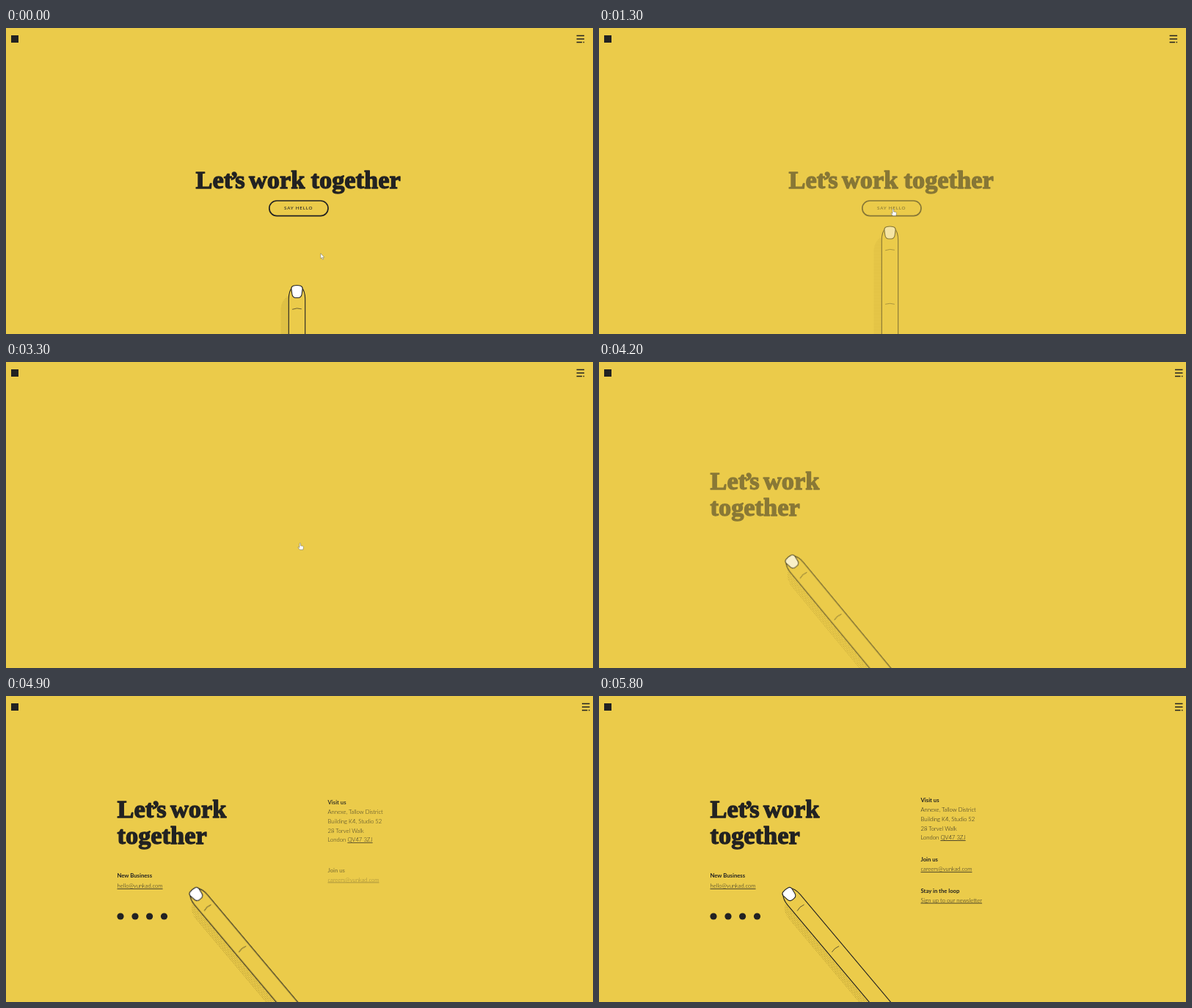
Animation of 800 by 418 pixels, one loop 5900 ms. Source, as an HTML page:

```html
<!DOCTYPE html>
<html lang="en">
<head>
<meta charset="utf-8">
<title>Let’s work together</title>
<style>
  html, body { margin: 0; width: 100%; height: 100%; overflow: hidden; background: #ebcb4a; }
  svg { display: block; width: 800px; height: 418px; fill: #222; }
  text { font: 300 7.7px Lato, sans-serif; white-space: pre; }
  .title { font: bold 34.4px "Liberation Serif", "Times New Roman", serif; stroke: #222; stroke-width: 1.3; stroke-linejoin: round; }
  .b { font-weight: 700; }
  .u { text-decoration: underline .6px; text-underline-offset: 1.8px; }
  .say { font-size: 6.2px; font-weight: 500; letter-spacing: .85px; }
  .line { fill: none; stroke: #222; stroke-width: 1.1; stroke-linecap: round; }
  .crease { stroke-width: .8; opacity: .8; }
  .cursor { fill: #fff; stroke: #665; stroke-width: .5; stroke-linejoin: round; }
</style>
</head>
<body>
<svg viewBox="0 0 800 418">
  <defs>
    <pattern id="dots" width="2" height="2" patternUnits="userSpaceOnUse">
      <rect width="1" height="1" fill="#6b5510" opacity=".5"/>
    </pattern>
    <!-- finger pointing up, tip at the origin -->
    <g id="finger">
      <path d="M-22 300V32Q-21 20-11 14V300Z" fill="url(#dots)" opacity=".75"/>
      <path class="line" style="fill:#ebcb4a" d="M-11.2 300V19Q-11.2 8-6 3H6Q11.2 8 11.2 19V300"/>
      <path class="line" style="fill:#fff" d="M-5 1Q0-.3 5 1Q7.8 2 7.6 5L6.7 12Q6 17.3 1.5 17.3H-1.5Q-6 17.3-6.7 12L-7.6 5Q-7.8 2-5 1Z"/>
      <path class="line crease" d="M-6 33Q0 30.5 6 32.5M-6 106.5Q0 104.5 6 106.5"/>
    </g>
  </defs>

  <rect x="7" y="10" width="10" height="10"/>
  <path id="menu" stroke="#222" stroke-width="1.4" d="M0 10.5H10.5M0 15H10.5M0 19.5H7.5M9 19.5H10.5"/>

  <g id="intro">
    <text class="title" x="258.5" y="218.5">Let<tspan dx="-3">’</tspan><tspan dx="-3">s</tspan> <tspan x="331">work</tspan> <tspan x="415.5">together</tspan></text>
    <rect class="line" style="stroke-width:1.7" x="358.8" y="236" width="80.2" height="20.6" rx="10.3"/>
    <text class="say" x="379" y="248.3">SAY HELLO</text>
    <use id="up" href="#finger"/>
  </g>

  <g id="contact">
    <use id="slant" href="#finger"/>
    <g data-at="4100" data-drop="16">
      <text class="title" x="151.5" y="166">Let<tspan dx="-3">’</tspan><tspan dx="-3">s</tspan> <tspan x="224">work</tspan></text>
      <text class="title" x="151.5" y="202">together</text>
    </g>
    <g data-at="4250" data-drop="24">
      <text class="b" x="151.5" y="248">New Business</text>
      <text class="u" x="151.5" y="262">hello@vunkad.com</text>
    </g>
    <g data-at="4420" data-drop="24">
      <circle cx="156" cy="301" r="4.6"/>
      <circle cx="176" cy="301" r="4.6"/>
      <circle cx="195.6" cy="301" r="4.6"/>
      <circle cx="215.5" cy="301" r="4.6"/>
    </g>
    <g data-at="4650" data-drop="24">
      <text class="b" x="438.5" y="145">Visit us</text>
      <text x="438.5" y="158.2">Annexe, Tallow District</text>
      <text x="438.5" y="170.8">Building K4, Studio 52</text>
      <text x="438.5" y="183.5">28 Torvel Walk</text>
      <text x="438.5" y="196.2">London <tspan class="u">QV47 3ZJ</tspan></text>
    </g>
    <g data-at="4820" data-drop="24">
      <text class="b" x="438.5" y="226.3">Join us</text>
      <text class="u" x="438.5" y="239.3">careers@vunkad.com</text>
    </g>
    <g data-at="4990" data-drop="24">
      <text class="b" x="438.5" y="268.7">Stay in the loop</text>
      <text class="u" x="438.5" y="281.7">Sign up to our newsletter</text>
    </g>
  </g>

  <g id="pointer" class="cursor">
    <path id="arrow" d="M0 0V7.2L1.6 5.8L2.7 8.4L3.9 7.9L2.8 5.4H5Z"/>
    <path id="hand" d="M.2 1Q.2 0 1 0T1.8 1V3.6L5 4.3Q5.7 4.6 5.6 5.6L5 9.2H.6L-1.6 6.2Q-2 5.2-1 5.3L.2 6.2Z"/>
  </g>
</svg>
<script>
const LOOP = 5900, STEP = 100;
const el = id => document.getElementById(id);
const blocks = [...document.querySelectorAll('[data-at]')];

const span = (t, from, length) => Math.min(1, Math.max(0, (t - from) / length));
const easeOut = u => 1 - (1 - u) ** 3;
const easeInOut = u => u * u * (3 - 2 * u);
const show = (node, on) => node.setAttribute('visibility', on ? 'visible' : 'hidden');
const place = (node, transform) => node.setAttribute('transform', transform);

function draw(t) {
  const loaded = t >= 3700;
  place(el('menu'), `translate(${loaded ? 785 : 777.6})`);

  // pointer travels to the button, the finger rises on hover
  const move = easeInOut(span(t, 200, 500));
  const y = 307.8 - 60.5 * move;
  place(el('pointer'), `translate(${428.8 - 29 * move} ${y})`);
  show(el('arrow'), !loaded && y >= 256);
  show(el('hand'), !loaded && y < 256);
  place(el('up'), `translate(396.5 ${351.2 - 80.5 * easeOut(span(t, 550, 450))})`);
  el('intro').setAttribute('opacity', 1 - span(t, 1050, 500));

  // contact page
  const come = easeOut(span(t, 4100, 300)), left = 1 - come;
  place(el('slant'), `translate(253.7 264.1) rotate(-40) translate(0 ${14 * left}) rotate(${1.5 * left} 0 230)`);
  el('slant').setAttribute('opacity', come);
  for (const block of blocks) {
    const e = easeOut(span(t, +block.dataset.at, 500));
    place(block, `translate(0 ${block.dataset.drop * (1 - e)})`);
    block.setAttribute('opacity', e);
  }
}

const start = performance.now();
function tick() {
  const t = (performance.now() - start) % LOOP;
  draw(Math.floor(t / STEP) * STEP); // ten pictures a second
  requestAnimationFrame(tick);
}
tick();
</script>
</body>
</html>
```
